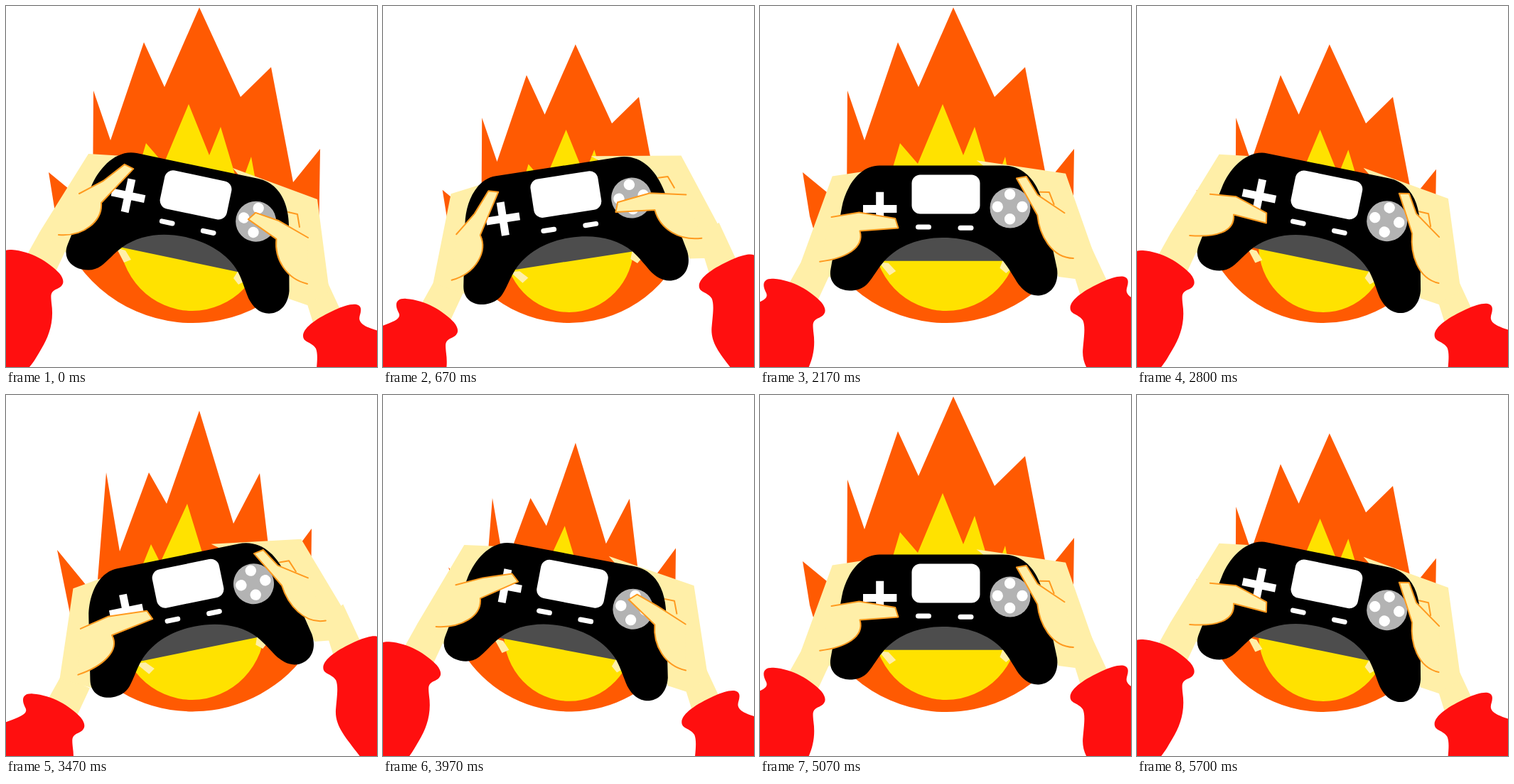
Write an HTML page that moves like this. It is 522 px wide and 508 px high and loops after 5.73 s.

```html
<!DOCTYPE html>
<html lang="en">
<head>
<meta charset="utf-8">
<title>Flame gamer</title>
<style>
  html, body { margin: 0; width: 100%; height: 100%; overflow: hidden; background: #fff; }
  svg { display: block; width: 522px; height: 508px; }
  .fire { fill: #ff5a02; }
  .core { fill: #ffe200; }
  .skin { fill: #ffefa8; }
  .sleeve { fill: #ff0f0f; }
  .line { fill: #ffefa8; stroke: #ff9a1f; stroke-width: 2; stroke-linejoin: round; stroke-linecap: round; }
  .white { fill: #fff; }
</style>
</head>
<body>
<svg viewBox="0 0 522 508">
  <g id="blaze">
    <g id="tall">
      <path class="fire" d="M70,296 L60,234 122,285 123,119 147,189 194,51 223,114 272,2 330,128 373,86
        404,248 442,201 440,335 A198 198 0 0 1 70,296 Z"/>
      <path class="core" d="M159,322 L197,193 222,222 257,138 286,210 302,170 323,240 333,245 345,212
        365,322 A103 107 0 0 1 159,322 Z"/>
    </g>
    <g id="lean">
      <path class="fire" d="M101,362 L72,218 127,285 141,109 160,220 201,109 226,153 272,22 320,181 357,110
        375,262 430,188 428,356 A198 198 0 0 1 101,362 Z"/>
      <path class="core" d="M159,322 L204,210 217,236 255,153 278,228 345,250 365,322 A103 107 0 0 1 159,322 Z"/>
    </g>
  </g>

  <g id="armL">
    <path class="skin" d="M48,317 L24,360 68,378 88,335 Z"/>
    <path class="sleeve" d="M-30,383 C-12,376 3,372 -3,362 C-9,350 -6,342 8,343 C35,345 60,360 75,376
      C84,387 81,394 72,398 C62,402 63,407 64,418 C68,445 60,465 50,482 C44,492 40,500 33,508
      L10,560 -90,560 -90,430 Z"/>
  </g>
  <g id="armR">
    <path class="skin" d="M446,375 L472,431 434,452 424,420 420,395 Z"/>
    <path class="sleeve" d="M418,464 C418,452 440,438 462,428 C480,420 496,416 499,425 C501,434 492,440 502,448
      C510,454 521,456 540,462 L640,500 640,640 500,640 469,588 C448,560 433,545 436,520
      C438,500 439,490 436,482 C430,472 418,474 418,464 Z"/>
  </g>

  <g id="palms" class="skin">
    <path d="M116,208 L165,211 150,300 100,330 86,348 48,317 Z"/>
    <path d="M319,228 L438,272 455,402 424,421 398,412 380,300 Z"/>
    <path d="M155,340 L168,344 176,357 166,361 Z"/>
    <path d="M327,372 L320,383 327,392 340,385 Z"/>
  </g>

  <g id="pad">
    <path fill="#4d4d4d" d="M-85,66.7 L-60,20 60,20 82,66.7 Z"/>
    <path d="M-92,-67.5 H82 C114,-67.5 132,-42 139,-10 L158,78 C161,102 147,115 132,115.5 C118,116 109,106 104,100
      C96,88 91,78 82,66.7 C62,44 30,34 -2,34 C-34,34 -64,44 -85,66.7 C-94,77 -101,90 -108,98
      C-115,106 -124,108.5 -134,108.5 C-151,108 -164,97 -160.5,78 L-145,-8 C-140,-36 -121,-67.5 -92,-67.5 Z"/>
    <rect class="white" x="-46.5" y="-54.5" width="96" height="55" rx="12"/>
    <rect class="white" x="-41" y="15.5" width="22" height="7" rx="3.5"/>
    <rect class="white" x="18.5" y="16.8" width="22" height="7" rx="3.5"/>
    <path stroke="#fff" stroke-width="11" d="M-115,-6.5 h47.4 M-91.3,-30.2 v47.4"/>
    <circle cx="92" cy="-8" r="28.5" fill="#b3b3b3"/>
    <path stroke="#fff" stroke-width="15.4" stroke-linecap="round" d="M91.6,-27 h0 M74.3,-9.5 h0 M109,-9.5 h0 M91.6,7.7 h0"/>
  </g>

  <g id="thumbs" class="line">
    <path d="M397,290 L410,293 413,311"/>
    <path id="thumbL"/>
    <path id="thumbR"/>
  </g>
</svg>

<script>
const $ = id => document.getElementById(id);
const LOOP = 5730, SWING = 11.9, PIVOT = '260 292', RAD = Math.PI / 180;

const lerp = (p, q, t) => [p[0] + (q[0] - p[0]) * t, p[1] + (q[1] - p[1]) * t];
const place = (id, transform) => $(id).setAttribute('transform', transform);

// Each thumb presses between a tip position at one end and a near/far spot at the other
const left = {
  id: 'thumbL', turn: 70, base: [103, 264], knuckle: [137, 246], joint: [134, 277],
  bend: [2, 25], palm: '110,325 74,322', rest: [173, 226], far: [200, 285], near: [182, 298]
};
const right = {
  id: 'thumbR', turn: -70, base: [425, 326], knuckle: [393, 293], joint: [387, 321],
  bend: [-3, 28], palm: '394,384 424,391', rest: [376, 264.5], far: [327.5, 308], near: [346, 295.5]
};

function moveThumb(t, press, reach) {
  const tip = lerp(t.rest, lerp(t.near, t.far, reach), press);
  const follow = (p, f) => p.map((v, i) => v + f * (tip[i] - t.rest[i]));
  const knuckle = follow(t.knuckle, .3), joint = follow(t.joint, .22);
  const mid = lerp(knuckle, joint, .5);
  const a = Math.atan2(tip[1] - mid[1], tip[0] - mid[0]) + t.turn * RAD;
  const corner = r => [tip[0] + r * Math.cos(a), tip[1] + r * Math.sin(a)];
  const bend = joint.map((v, i) => v + t.bend[i]);
  $(t.id).setAttribute('d',
    `M${t.base} L${knuckle} ${corner(-7)} ${corner(7)} ${joint} C${bend} ${t.palm}`);
}

// 25 drawings a second, shown on a 30 Hz clock rounded to 10 ms
function drawingAt(ms) {
  const r = ms % 100;
  const tick = Math.floor(ms / 100) * 3 + (r >= 70 ? 2 : r >= 30 ? 1 : 0);
  return Math.floor(tick * 5 / 6);
}

function swing(k) {
  const u = (k % 12) / 12;
  const ease = x => .5 * Math.pow(2 * x, 3.3);
  const e = u < .5 ? ease(u) : 1 - ease(1 - u);
  return SWING * (k < 12 ? 1 - 2 * e : 2 * e - 1);
}

// Arms follow a point on the swing but keep their own direction
function moveArm(id, x, y, deg) {
  const turn = d => {
    const c = Math.cos(d * RAD), s = Math.sin(d * RAD);
    return [x * c - y * s, x * s + y * c];
  };
  const from = turn(SWING), to = turn(deg);
  place(id, `translate(${to[0] - from[0]} ${to[1] - from[1]})`);
}

function moveFire(k) {
  const leaning = k === 2 || k === 3;
  const size = [1, .98, 1, .893, .883, .94][k];
  $('tall').style.display = leaning ? 'none' : '';
  $('lean').style.display = leaning ? '' : 'none';
  place('blaze', `translate(262 446) scale(${size}) translate(-262 -446)`);
}

function draw(n) {
  const k = n % 24, deg = swing(k);
  moveFire(k % 6);
  place('pad', `translate(${PIVOT}) rotate(${deg})`);
  for (const id of ['palms', 'thumbs']) place(id, `rotate(${deg - SWING} ${PIVOT})`);
  moveArm('armL', -190, 74, deg);
  moveArm('armR', 198, 69, deg);

  const press = .5 - .5 * Math.cos(k * Math.PI / 2);
  moveThumb(left, press, 1 - Math.floor(k / 4) % 3 / 2);
  moveThumb(right, 1 - press, Math.floor((k + 2) / 4) * 2 % 3 / 2 === .5 ? .5 : Math.floor((k + 2) / 4) % 3 ? 1 : 0);
}

const start = performance.now();
let shown = -1;
function loop() {
  const n = drawingAt((performance.now() - start) % LOOP);
  if (n !== shown) draw(shown = n);
  requestAnimationFrame(loop);
}
loop();
</script>
</body>
</html>
```
